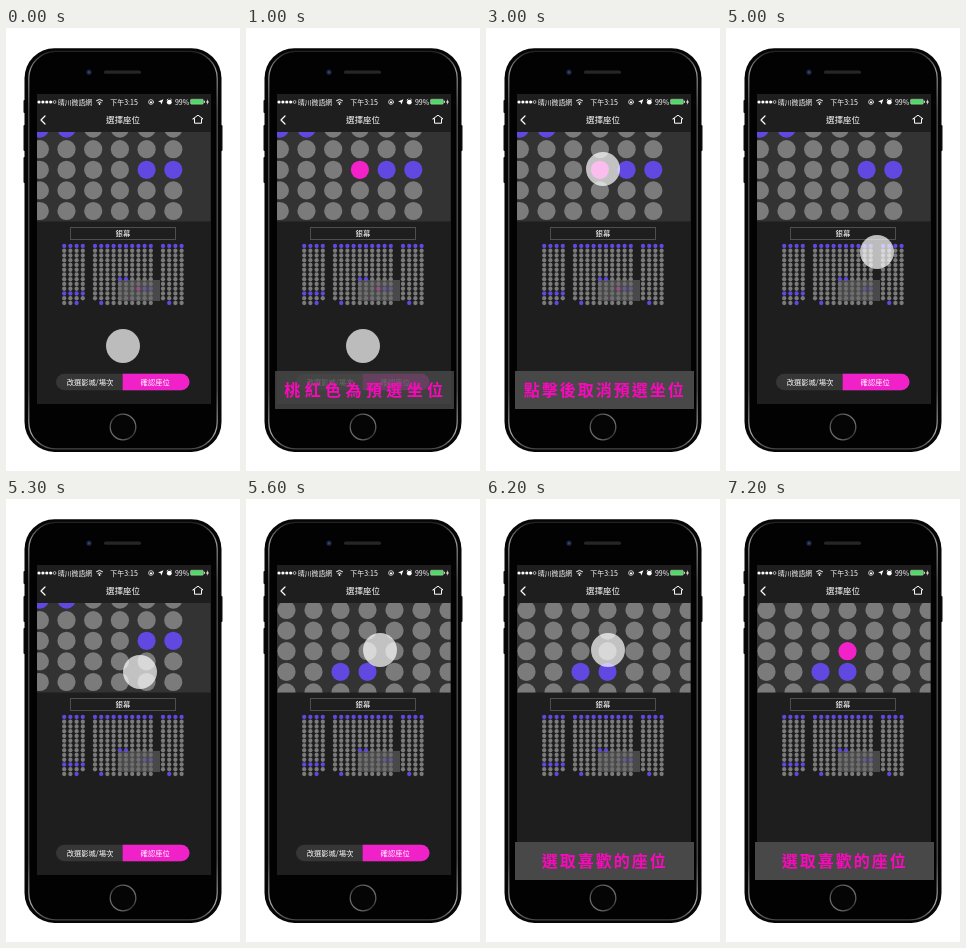
Animation, 234 px wide and 443 px high, one loop 8000 ms. Source, as an HTML page:

```html
<!DOCTYPE html>
<html lang="zh-Hant">
<head>
<meta charset="utf-8">
<title>選擇座位</title>
<style>
html, body { margin: 0; width: 100%; height: 100%; overflow: hidden; background: #fff; }
svg { display: block; width: 100vw; height: 100vh; }
text { font-family: "Noto Sans CJK TC", "Noto Sans CJK SC", "Noto Sans CJK", "Noto Sans", sans-serif; fill: #fff; text-anchor: middle; }
.line { fill: none; stroke: #fff; stroke-linejoin: round; stroke-linecap: round; }
#label { font-size: 16px; font-weight: 700; fill: #fb08bd; }
</style>
</head>
<body>
<svg viewBox="0 0 234 443">
  <defs>
    <clipPath id="view"><rect x="31" y="104" width="173.5" height="89.5"/></clipPath>
    <linearGradient id="rim" x1="0" y1="0" x2="0" y2="1">
      <stop offset="0" stop-color="#222"/>
      <stop offset=".05" stop-color="#999"/>
      <stop offset=".15" stop-color="#555"/>
      <stop offset=".85" stop-color="#555"/>
      <stop offset=".96" stop-color="#aaa"/>
      <stop offset="1" stop-color="#444"/>
    </linearGradient>
    <linearGradient id="ring" x1="0" y1="1" x2="1" y2="0">
      <stop offset="0" stop-color="#888"/>
      <stop offset=".5" stop-color="#333"/>
      <stop offset="1" stop-color="#888"/>
    </linearGradient>
  </defs>

  <g fill="#111">
    <rect x="17.5" y="72" width="4" height="13" rx="1"/>
    <rect x="17.5" y="97" width="4" height="26" rx="1"/>
    <rect x="17.5" y="129" width="4" height="26" rx="1"/>
    <rect x="212.5" y="97" width="4" height="26" rx="1"/>
  </g>
  <rect x="18.5" y="20.3" width="197" height="403.6" rx="30" fill="#050505"/>
  <rect x="22.8" y="23.3" width="188.4" height="397.6" rx="27" fill="#020202" stroke="url(#rim)" stroke-width="1.2"/>
  <rect x="98" y="42.6" width="37" height="3.2" rx="1.6" fill="#262626"/>
  <circle cx="83" cy="44.2" r="2.6" fill="#1c2340"/>
  <circle cx="83" cy="44.2" r="1.2" fill="#34426e"/>
  <circle cx="117" cy="399" r="12.8" fill="#050505" stroke="url(#ring)" stroke-width="1.3"/>

  <rect x="31" y="66" width="174" height="310" fill="#1e1e1e"/>

  <g id="status" fill="#fff">
    <text x="69" y="76.6" font-size="6.8">晴川微語網</text>
    <path class="line" d="M90.5 72.6q3-2.7 6 0M91.9 74.4q1.6-1.4 3.2 0" stroke-width="1"/>
    <circle cx="93.5" cy="76" r=".9"/>
    <text x="118" y="76.6" font-size="7" font-weight="500">下午3:15</text>
    <circle class="line" cx="145" cy="74" r="2.4" stroke-width=".7"/>
    <rect x="144" y="73.5" width="2" height="1.7"/>
    <path d="M157.4 71.3l-2 5.2-.8-2.3-2.5-.6z"/>
    <circle cx="163.3" cy="74.2" r="2.4"/>
    <path class="line" d="M161 72l1-.9M165.6 72l-1-.9" stroke-width=".8"/>
    <text x="176" y="76.6" font-size="7">99%</text>
    <rect x="184.5" y="71.2" width="12.8" height="5" rx="1" fill="#53d769" stroke="#ddd" stroke-width=".4"/>
    <rect x="197.9" y="72.8" width=".9" height="2"/>
    <path d="M202 71l-2 3.4h1.4l-.6 2.6 2.2-3.5h-1.4z"/>
  </g>

  <path class="line" d="M39 88l-4 4 4 4" stroke-width="1.2"/>
  <text x="117" y="95.2" font-size="8.5">選擇座位</text>
  <path class="line" d="M187 90.8l5-3.6 5 3.6h-1.5v4.4h-7v-4.4z" stroke-width="1"/>

  <rect x="31" y="104" width="173.5" height="89.5" fill="#333"/>
  <g clip-path="url(#view)">
    <g id="before"></g>
    <g id="after"></g>
  </g>

  <rect x="64.5" y="199.5" width="105" height="12" fill="none" stroke="#4e4e4e"/>
  <text x="117" y="208.4" font-size="7.4">銀幕</text>
  <g id="map"></g>
  <rect x="112" y="252" width="42" height="21" fill="#666" opacity=".6"/>

  <g id="buttons">
    <rect x="50" y="345.7" width="133.5" height="16.6" rx="8.3" fill="#363636"/>
    <path d="M116.7 345.7h58.5a8.3 8.3 0 0 1 0 16.6h-58.5z" fill="#f121c9"/>
    <text x="84" y="356.8" font-size="7.3">改選影城/場次</text>
    <text x="149.2" y="356.8" font-size="7.3">確認座位</text>
  </g>
  <g id="banner">
    <rect id="plate" x="29" y="343" width="179" height="38" fill="#484848"/>
    <text id="label" y="368"></text>
  </g>
  <circle id="touch" r="17" fill="#fff" opacity=".7"/>
</svg>

<script>
const GRAY = '#7b7b7b', PURPLE = '#6048e0', PINK = '#f321c8';
const LOOP = 8000;
const $ = id => document.getElementById(id);

function dot(parent, cx, cy, r, fill) {
  const c = document.createElementNS('http://www.w3.org/2000/svg', 'circle');
  const attrs = { cx, cy, r, fill };
  for (const k in attrs) c.setAttribute(k, attrs[k]);
  return parent.appendChild(c);
}

// Fills a grid of seats; taken and skip hold "column,row" keys.
function grid(parent, x, y, dx, dy, cols, rows, r, taken, skip = []) {
  const seats = {};
  for (let j = 0; j < rows; j++) for (let i = 0; i < cols; i++) {
    const key = i + ',' + j;
    if (skip.includes(key)) continue;
    seats[key] = dot(parent, x + i * dx, y + j * dy, r, taken.includes(key) ? PURPLE : GRAY);
  }
  return seats;
}

const topRow = n => Array.from({ length: n }, (_, i) => i + ',0');

for (let i = 0; i < 5; i++) {
  const d = dot($('status'), 33 + i * 3.9, 74, i < 4 ? 1.6 : 1.4, i < 4 ? '#fff' : 'none');
  if (i == 4) d.setAttribute('style', 'stroke: #fff; stroke-width: .6');
}

const before = grid($('before'), 33.8, 100.6, 26.7, 20.6, 6, 5, 9.1, ['0,0', '1,0', '4,2', '5,2']);
const after = grid($('after'), 40.5, 111, 27, 20.6, 7, 5, 9.1, ['2,3', '3,3']);

const map = (x, cols, taken, skip) =>
  grid($('map'), x, 218, 6.2, 4.75, cols, 13, 2.15, topRow(cols).concat(taken), skip);
map(58.2, 4, ['0,10', '1,10', '2,10', '3,10', '2,12'], ['3,12']);
const middle = map(89, 10, ['4,7', '5,7', '8,9', '9,9', '1,12'], ['0,12']);
map(157, 4, ['1,12'], ['0,12']);

// start, touch point, scrolled, seat picked, buttons shown, caption, letter pitch
const steps = [
  [0,    [117, 318], 0, 0, 1, ''],
  [1000, [117, 318], 0, 1, 1, '桃紅色為預選坐位', 20.4],
  [3000, [117, 141], 0, 1, 0, '點擊後取消預選坐位', 18],
  [5000, [151, 224], 0, 0, 1, ''],
  [5300, [134, 173], 0, 0, 1, ''],
  [5600, [134, 151], 1, 0, 1, ''],
  [5900, [157, 158], 1, 0, 1, ''],
  [6200, [122, 151], 1, 0, 0, '選取喜歡的座位', 18],
  [7200, null,       1, 1, 0, '選取喜歡的座位', 18]
];

const show = (el, on) => el.style.display = on ? '' : 'none';

function draw([start, point, scrolled, picked, buttons, caption, pitch]) {
  show($('before'), !scrolled);
  show($('after'), scrolled);
  (scrolled ? after : before)['3,2'].setAttribute('fill', picked ? PINK : GRAY);
  middle['7,9'].setAttribute('fill', start < 5000 ? PINK : GRAY);
  show($('buttons'), buttons);
  show($('banner'), caption);
  if (caption) {
    const gap = pitch - 16;
    $('plate').setAttribute('opacity', buttons ? .82 : 1);
    $('label').textContent = caption;
    $('label').setAttribute('x', 117.7 + gap / 2);
    $('label').style.letterSpacing = gap + 'px';
  }
  show($('touch'), point);
  if (point) $('touch').setAttribute('transform', `translate(${point})`);
}

const began = performance.now();
let current;
function tick() {
  const t = (performance.now() - began) % LOOP;
  const step = steps.filter(s => s[0] <= t).pop();
  if (step !== current) draw(current = step);
  requestAnimationFrame(tick);
}
tick();
</script>
</body>
</html>
```
